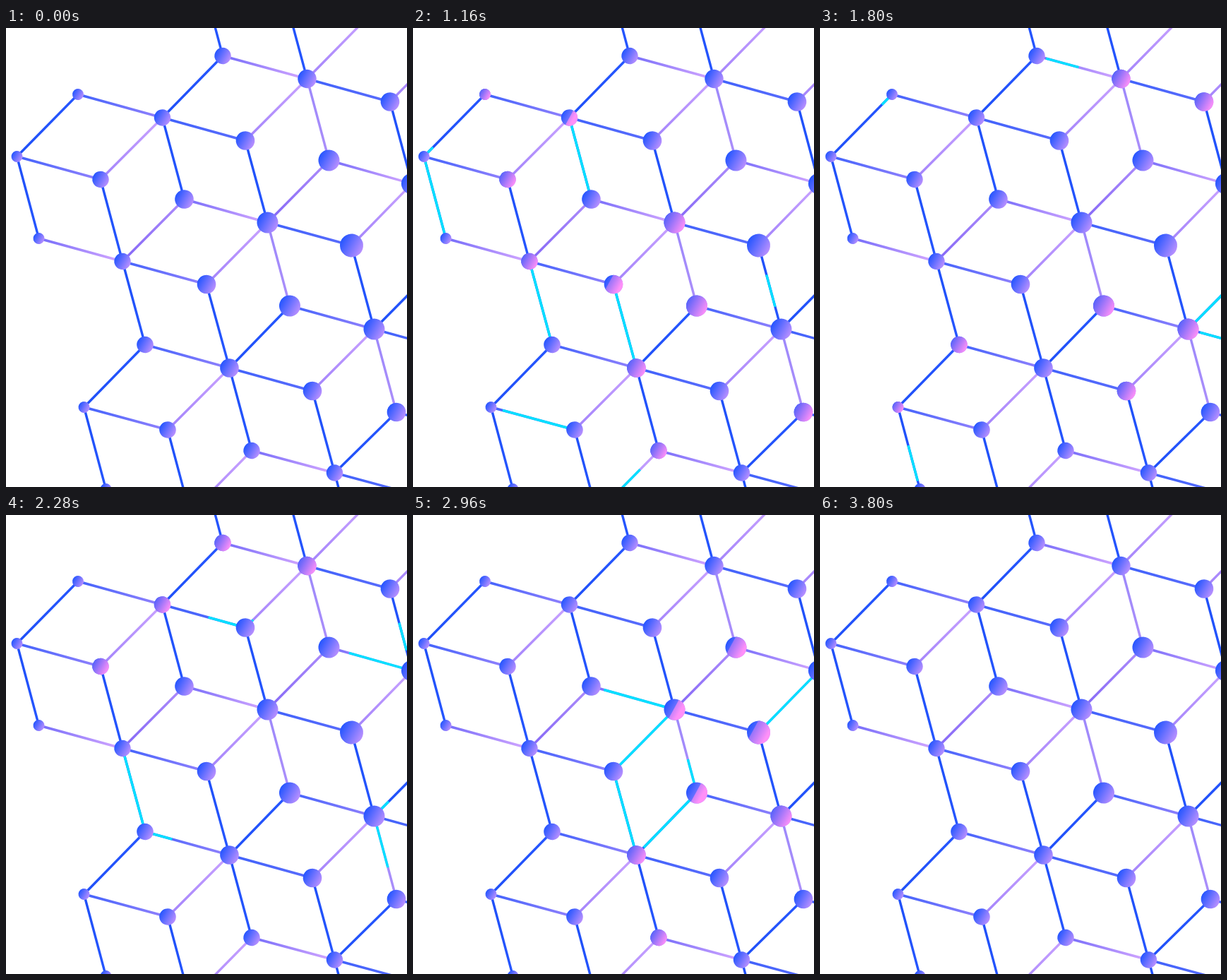
An HTML page with a canvas that plays this animation: 568 px wide and 650 px high, repeating every 4 s.

```html
<!DOCTYPE html>
<html lang="en">
<head>
<meta charset="utf-8">
<title>Network pulses</title>
<style>
html, body { margin: 0; width: 100%; height: 100%; overflow: hidden; background: #fff; }
canvas { display: block; }
</style>
</head>
<body>
<canvas id="stage" width="568" height="650"></canvas>
<script>
const ctx = document.getElementById('stage').getContext('2d');
const LOOP = 4000, STEP = 40, SPEED = 0.45, SWAP = 120, TILT = 0.5;

// Visible nodes: x, y, radius
const nodes = {
  A: [15.5, 182, 8], B: [102, 94, 8], C: [134, 214.5, 11.7], D: [221.5, 127, 11.7],
  E: [46.5, 298, 8], F: [165, 330.5, 11.7], G: [252.5, 242.5, 13.3], H: [339, 159.5, 13.3],
  I: [307, 39.5, 11.7], J: [426.5, 72, 13.2], K: [544, 104.5, 13.3], L: [457.5, 187.5, 15],
  M: [370.5, 275.5, 15], N: [489.5, 308, 16.5], O: [284, 363, 13.3], P: [197, 448.5, 11.8],
  Q: [316.5, 481.5, 13.3], R: [402, 393.5, 15], S: [521.5, 426.5, 15], T: [434, 514, 13.3],
  U: [229, 569, 11.8], V: [110.5, 537, 8], W: [348, 598.5, 11.7], X: [465.5, 630, 11.7],
  Y: [553, 544, 13.3], Z: [141.5, 653, 8], a: [575, 220.5, 15]
};
// Ends that lie outside the stage
const outer = {
  b: [276, -77], c: [395, -45], d: [513, -16], e: [630, 17], f: [608, 339],
  g: [640, 459], h: [584, 662], i: [496, 746], j: [672, 577], k: [261, 687], l: [260, 685]
};
const at = id => nodes[id] || outer[id];

// Edges grouped by their left and right colours
const edges = [
  ['#1f50f8', '#2656ff', 'AB AE CF DG DI HM FP OQ QR QW VP VZ NS TX XY Ka Ib Jc Sf Ul Xi'],
  ['#4062fb', '#5a6cfc', 'DH JK MN QT Sg Xh Yj'],
  ['#4162fc', '#9482fc', 'AC BD FO PQ VU RS'],
  ['#746cfa', '#d6a8ff', 'EF IJ GM La WX'],
  ['#8467f6', '#ae8dfb', 'FG LM'],
  ['#a283fb', '#c9a2ff', 'CD OM HJ Jd UQ Wk TS Na Ke'],
  ['#9c88fb', '#ac8ffa', 'JL MR SY']
];

// Path, start time, trail length
const pulses = [
  ['MHD', 176, 168], ['MGD', 258, 125], ['TQO', 209, 137], ['LM', 405, 130],
  ['Xh', 400, 130], ['Jc', 300, 60],
  ['MGD', 618, 122], ['BAE', 620, 138], ['FP', 885, 125], ['QO', 885, 125],
  ['NS', 960, 47], ['VU', 900, 100], ['Wk', 890, 84],
  ['JI', 1555, 48], ['BA', 1755, 60], ['VZ', 1560, 52], ['Sf', 1600, 75], ['Sg', 1650, 50],
  ['JHD', 1884, 70], ['Ka', 2080, 40], ['La', 2010, 92], ['FPQ', 1920, 157],
  ['SY', 2113, 75], ['Sf', 2215, 30],
  ['Jc', 2400, 60], ['MG', 2729, 90], ['QOM', 2418, 235], ['QRM', 2578, 157], ['Na', 2685, 125],
  ['EFO', 3020, 100], ['NM', 3150, 90], ['KJ', 3350, 60]
];

// Glow intervals per node: on, off
const glows = {
  A: [1220, 1500, 2000, 2240], B: [400, 1300], C: [950, 1400, 2100, 2600],
  D: [1100, 1400, 2100, 2600], E: [3300, 3780], F: [900, 1400], I: [2100, 2600],
  J: [300, 900, 1600, 2500], K: [1600, 2050, 3400, 3780], L: [350, 850, 2870, 3350],
  M: [170, 1400, 2895, 3400], N: [2870, 3500], O: [1070, 1500], P: [1600, 2050],
  Q: [980, 1450, 2700, 3300], R: [950, 1400, 1600, 2100, 2895, 3400],
  S: [1600, 2100, 2750, 3300], T: [180, 800, 1550, 2100], V: [1600, 2050],
  W: [950, 1400, 2750, 3400], X: [350, 850, 2500, 2800], Y: [950, 1400]
};

const clamp = (v, lo, hi) => Math.min(hi, Math.max(lo, v));

function blend(x0, y0, x1, y1, from, to) {
  const g = ctx.createLinearGradient(x0, y0, x1, y1);
  g.addColorStop(0, from);
  g.addColorStop(1, to);
  return g;
}

function line(x0, y0, x1, y1) {
  ctx.beginPath();
  ctx.moveTo(x0, y0);
  ctx.lineTo(x1, y1);
  ctx.stroke();
}

function drawEdges() {
  for (const [from, to, list] of edges) {
    for (const [p, q] of list.split(' ')) {
      const [l, r] = [at(p), at(q)].sort((m, n) => m[0] - n[0]);
      ctx.strokeStyle = blend(l[0], l[1], r[0], r[1], from, to);
      line(l[0], l[1], r[0], r[1]);
    }
  }
}

function drawPulse([path, start, length], t) {
  const head = (t - start) * SPEED, tail = head - length;
  let walked = 0;
  for (let n = 1; n < path.length; n++) {
    const [x0, y0] = at(path[n - 1]), [x1, y1] = at(path[n]);
    const size = Math.hypot(x1 - x0, y1 - y0);
    const u = clamp((tail - walked) / size, 0, 1);
    const v = clamp((head - walked) / size, 0, 1);
    if (v > u) {
      line(x0 + (x1 - x0) * u, y0 + (y1 - y0) * u, x0 + (x1 - x0) * v, y0 + (y1 - y0) * v);
    }
    walked += size;
  }
}

function glowLevel(id, t) {
  const spans = glows[id] || [];
  let level = 0;
  for (let n = 0; n < spans.length; n += 2) {
    level = Math.max(level, Math.min((t - spans[n]) / SWAP, (spans[n + 1] - t) / SWAP));
  }
  return clamp(level, 0, 1);
}

// The pink glow wipes across the tilted blue-to-lilac disc
function drawNode(id, t) {
  const [x, y, r] = nodes[id], level = glowLevel(id, t);
  ctx.save();
  ctx.translate(x, y);
  ctx.rotate(TILT);
  ctx.beginPath();
  ctx.arc(0, 0, r, 0, Math.PI * 2);
  ctx.fillStyle = blend(-r, 0, r, 0, '#2455ff', '#b990ff');
  ctx.fill();
  if (level) {
    const hidden = 2 * r * (1 - level);
    ctx.clip();
    ctx.fillStyle = blend(-r - hidden / 2, 0, r - hidden / 2, 0, '#5862fa', '#ff90f8');
    ctx.fillRect(hidden - r, -r, 2 * r, 2 * r);
  }
  ctx.restore();
}

function draw(now) {
  const t = Math.floor((now % LOOP) / STEP) * STEP;
  ctx.fillStyle = '#fff';
  ctx.fillRect(0, 0, 568, 650);
  ctx.lineWidth = 3.4;
  drawEdges();
  ctx.strokeStyle = '#00e0ff';
  pulses.forEach(p => drawPulse(p, t));
  Object.keys(nodes).forEach(id => drawNode(id, t));
}

const begin = performance.now();
function tick() {
  draw(performance.now() - begin);
  requestAnimationFrame(tick);
}
tick();
</script>
</body>
</html>
```
